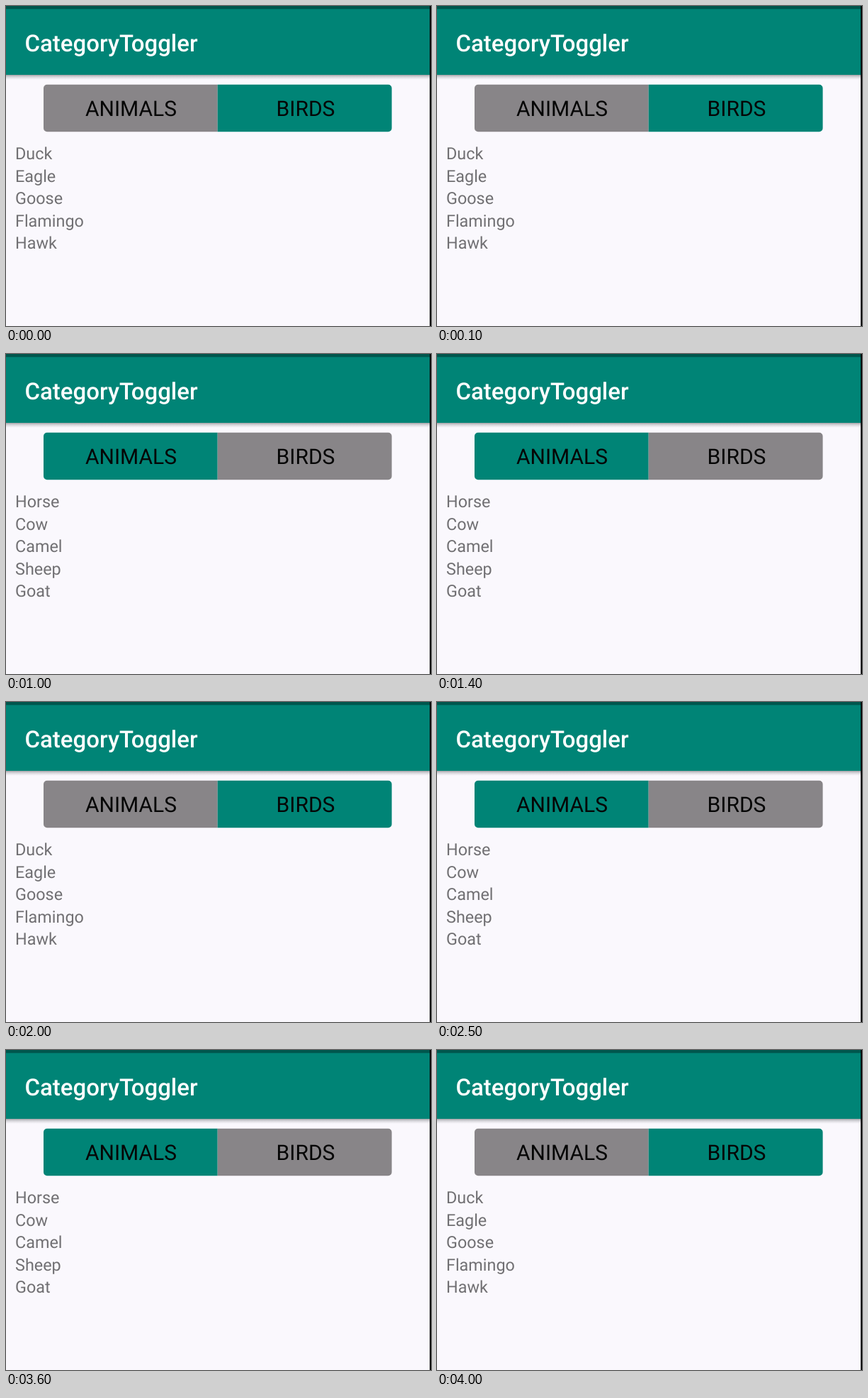
These frames come from a looping animation (600 by 451 pixels, 4100 ms). An HTML page:

```html
<!DOCTYPE html>
<html lang="en">
<head>
<meta charset="utf-8">
<title>Category toggle</title>
<style>
  html, body { margin: 0; width: 100%; height: 100%; overflow: hidden; background: #faf8fd; }
  svg { display: block; width: 600px; height: 451px; }
  text { font-family: Roboto, sans-serif; text-rendering: geometricPrecision; }
  .title { font-size: 33px; font-weight: 500; fill: #fff; }
  .label { font-size: 30px; fill: #050505; text-anchor: middle; }
  .item { font-size: 23.4px; fill: #717073; }
</style>
</head>
<body>
<svg viewBox="0 0 600 451">
  <defs>
    <linearGradient id="shade" x1="0" y1="0" x2="0" y2="1">
      <stop offset="0" stop-color="#77777b" stop-opacity=".7"/>
      <stop offset=".35" stop-color="#909095" stop-opacity=".4"/>
      <stop offset="1" stop-color="#b0b0b5" stop-opacity="0"/>
    </linearGradient>
  </defs>
  <rect width="600" height="451" fill="#faf8fd"/>
  <rect y="97" width="599" height="7" fill="url(#shade)"/>
  <rect width="599" height="97" fill="#008476"/>
  <rect width="599" height="4.3" fill="#00564d"/>
  <text class="title" x="26.4" y="64">CategoryToggler</text>

  <path id="left" d="M298.7 110.8H58a5 5 0 0 0-5 5v56.5a5 5 0 0 0 5 5H298.7z"/>
  <path id="right" d="M298.7 110.8H539.6a5 5 0 0 1 5 5v56.5a5 5 0 0 1-5 5H298.7z"/>
  <text class="label" x="176.5" y="155">ANIMALS</text>
  <text class="label" x="423" y="155">BIRDS</text>

  <g id="list"></g>
  <rect x="598.2" width="1.8" height="451" fill="#050505"/>
</svg>
<script>
  const LOOP = 4100;
  const TAPS = [300, 1500, 2300, 2800, 3300, 3800];
  const ON = "#008476", OFF = "#888588";
  const ANIMALS = ["Horse", "Cow", "Camel", "Sheep", "Goat"];
  const BIRDS = ["Duck", "Eagle", "Goose", "Flamingo", "Hawk"];

  const byId = id => document.getElementById(id);
  const left = byId("left"), right = byId("right"), list = byId("list");

  const rows = BIRDS.map((_, i) => {
    const row = document.createElementNS("http://www.w3.org/2000/svg", "text");
    row.setAttribute("class", "item");
    row.setAttribute("x", 13);
    row.setAttribute("y", 216 + i * 31.55);
    return list.appendChild(row);
  });

  let shown = null;

  // Every tap flips the selection; the loop begins on birds.
  function render(t) {
    const animals = TAPS.filter(tap => t >= tap).length % 2 === 1;
    if (animals === shown) return;
    shown = animals;
    left.setAttribute("fill", animals ? ON : OFF);
    right.setAttribute("fill", animals ? OFF : ON);
    const names = animals ? ANIMALS : BIRDS;
    rows.forEach((row, i) => { row.textContent = names[i]; });
  }

  const start = performance.now();
  function tick() {
    render((performance.now() - start) % LOOP);
    requestAnimationFrame(tick);
  }
  render(0);
  requestAnimationFrame(tick);
</script>
</body>
</html>
```
